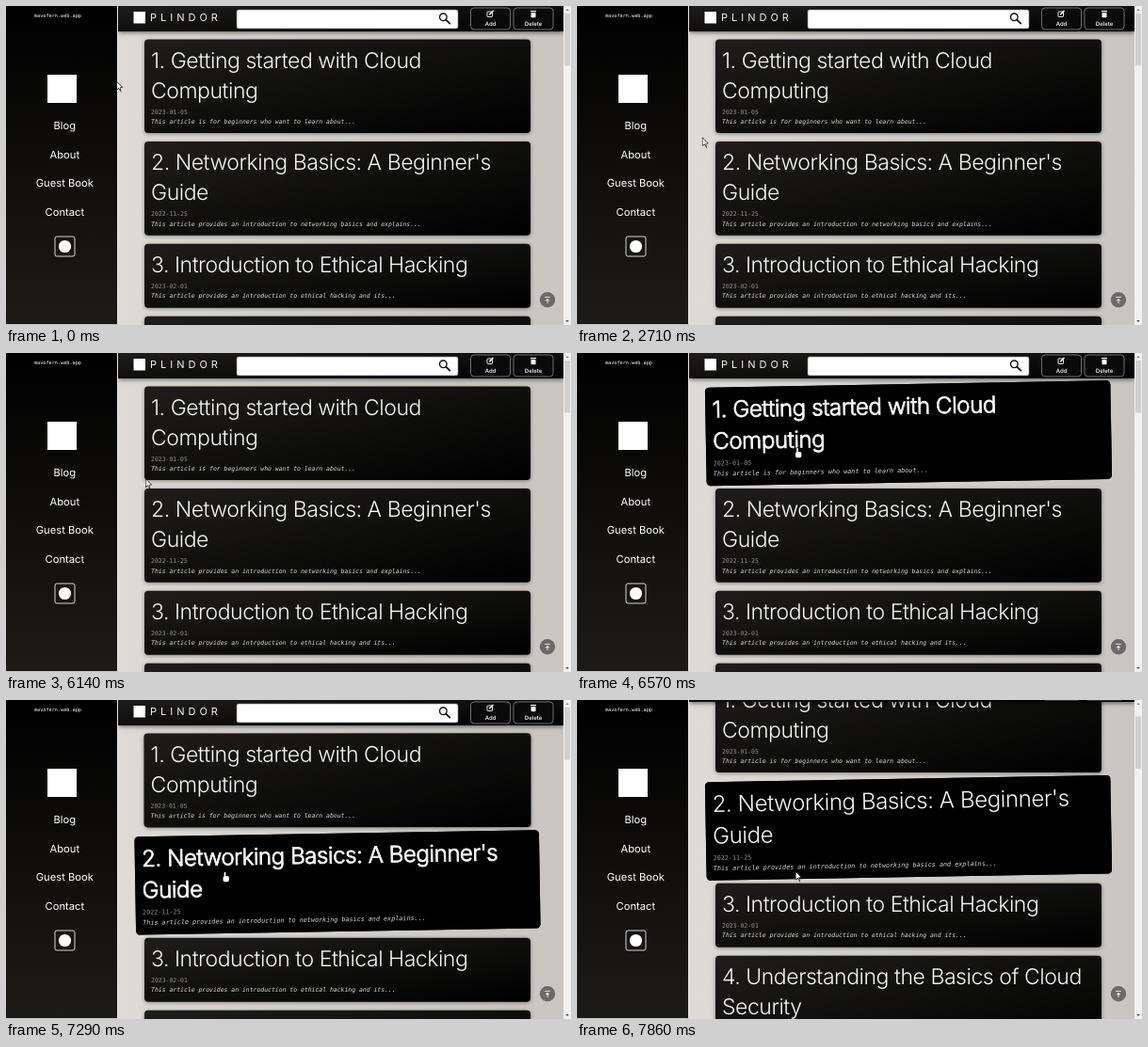
These frames come from a looping animation (600x339 px, 8 s). An HTML page with a canvas:

```html
<!DOCTYPE html>
<html lang="en">
<head>
<meta charset="utf-8">
<title>Article list</title>
<style>
html, body { margin: 0; width: 100%; height: 100%; overflow: hidden; background: #000; }
canvas { display: block; width: 600px; height: 339px; }
</style>
</head>
<body>
<canvas id="stage" width="600" height="339"></canvas>
<script>
const ctx = document.getElementById('stage').getContext('2d');
const W = 600, H = 339, LOOP = 8000, FPS = 7;
const SIDE = 119, BAR = 592, HEADER = 27;
const SANS = 'Inter, "Open Sans", sans-serif';
const MONO = '"DejaVu Sans Mono", "Liberation Mono", monospace';
const CARD_X = 147, CARD_W = 410, GAP = 9, LINE = 32;

const articles = [
  { title: ['1. Getting started with Cloud', 'Computing'], date: '2023-01-05',
    note: 'This article is for beginners who want to learn about...' },
  { title: ['2. Networking Basics: A Beginner\'s', 'Guide'], date: '2022-11-25',
    note: 'This article provides an introduction to networking basics and explains...' },
  { title: ['3. Introduction to Ethical Hacking'], date: '2023-02-01',
    note: 'This article provides an introduction to ethical hacking and its...' },
  { title: ['4. Understanding the Basics of Cloud', 'Security'], date: '', note: '' }
];

// Stack the cards; each extra title line makes a card taller.
let nextY = 35.5;
const cards = articles.map(a => {
  const card = { ...a, y: nextY, h: 68 + (a.title.length - 1) * 31.6 };
  nextY += card.h + GAP;
  return card;
});

const moves = [
  { from: 0, to: 290, x: 97, y: 170 },
  { from: 1290, to: 2400, x: 133.5, y: 140.5 },
  { from: 6000, to: 6570, x: 234, y: 101 },
  { from: 6700, to: 7100, x: 232.5, y: 183 }
];

const clamp = v => Math.max(0, Math.min(1, v));
const ramp = (t, start, length) => clamp((t - start) / length);
const easeOut = p => 1 - (1 - p) ** 2.5;
const smooth = p => p * p * (3 - 2 * p);

function snap(t) {
  const mark = n => Math.round(n * 100 / FPS) * 10;
  let n = Math.floor(t * FPS / 1000) + 1;
  while (mark(n) > t) n--;
  return mark(n);
}

function pointerAt(t) {
  let x = 118, y = 81;
  for (const m of moves) {
    const p = smooth(ramp(t, m.from, m.to - m.from));
    x += (m.x - x) * p;
    y += (m.y - y) * p;
  }
  return { x, y };
}

// Gradient whose middle line joins the bottom left and top right corners.
function cornerGradient(x, y, w, h, light, dark) {
  const k = w * h / (w * w + h * h);
  const cx = x + w / 2, cy = y + h / 2;
  const g = ctx.createLinearGradient(cx - h * k, cy - w * k, cx + h * k, cy + w * k);
  g.addColorStop(0, light);
  g.addColorStop(1, dark);
  return g;
}

function text(str, x, y, font, color, spacing = 0, align = 'left') {
  ctx.font = font;
  ctx.letterSpacing = spacing + 'px';
  ctx.textAlign = align;
  ctx.fillStyle = color;
  ctx.fillText(str, x, y);
}

function rect(x, y, w, h, color) {
  ctx.fillStyle = color;
  ctx.fillRect(x, y, w, h);
}

function box(x, y, w, h, r, fill, stroke, line = 1) {
  ctx.beginPath();
  ctx.roundRect(x, y, w, h, r);
  if (fill) { ctx.fillStyle = fill; ctx.fill(); }
  if (stroke) { ctx.strokeStyle = stroke; ctx.lineWidth = line; ctx.stroke(); }
}

function line(x0, y0, x1, y1, color, width) {
  ctx.beginPath();
  ctx.moveTo(x0, y0);
  ctx.lineTo(x1, y1);
  ctx.strokeStyle = color;
  ctx.lineWidth = width;
  ctx.stroke();
}

function circle(x, y, r, fill, stroke, width) {
  ctx.beginPath();
  ctx.arc(x, y, r, 0, Math.PI * 2);
  if (fill) { ctx.fillStyle = fill; ctx.fill(); }
  if (stroke) { ctx.strokeStyle = stroke; ctx.lineWidth = width; ctx.stroke(); }
}

// dir is -1 for a tip pointing up, 1 for down
function triangle(x, y, size, dir, color) {
  ctx.beginPath();
  ctx.moveTo(x - size, y - dir * size / 2);
  ctx.lineTo(x + size, y - dir * size / 2);
  ctx.lineTo(x, y + dir * size / 2);
  ctx.fillStyle = color;
  ctx.fill();
}

function shadow(alpha, blur) {
  ctx.shadowColor = `rgba(0,0,0,${alpha})`;
  ctx.shadowBlur = blur;
  ctx.shadowOffsetY = alpha ? 1 : 0;
}

function drawPage() {
  const g = ctx.createLinearGradient(SIDE, 0, BAR, 0);
  g.addColorStop(0, '#dedbd7');
  g.addColorStop(1, '#c9c5c0');
  rect(SIDE, 0, BAR - SIDE, H, g);
}

function drawCard({ y, h, title, date, note }, hover, bold) {
  const cx = CARD_X + CARD_W / 2, cy = y + h / 2, grow = 1 + 0.05 * hover;
  ctx.save();
  ctx.translate(cx, cy);
  ctx.rotate(-hover * Math.PI / 180);
  ctx.scale(grow, grow);
  ctx.translate(-cx, -cy);

  shadow(0.4 * (1 - hover), 4);
  box(CARD_X, y, CARD_W, h, 4, cornerGradient(CARD_X, y, CARD_W, h, '#1e1d1b', '#000'));
  shadow(0, 0);
  box(CARD_X, y, CARD_W, h, 4, `rgba(0,0,0,${hover})`);

  title.forEach((str, i) => {
    const base = y + 30.3 + i * LINE;
    text(str, 154, base, `350 23px ${SANS}`, '#f6f6f6', -0.45);
    if (bold) {
      ctx.strokeStyle = '#fff';
      ctx.lineWidth = 0.75;
      ctx.strokeText(str, 154, base);
    }
  });
  const foot = y + 47 + (title.length - 1) * LINE;
  text(date, 154, foot, `6.45px ${MONO}`, '#929190');
  text(note, 154, foot + 10.4, `italic 6.45px ${MONO}`, '#dcdbda');
  ctx.restore();
}

function drawButton(x, label) {
  box(x, 2, 42, 23, 3.5, '#0b0a0a', '#8a8987', 0.8);
  text(label, x + 21, 20.6, `500 6px ${SANS}`, '#fff', 0, 'center');
}

function drawHeader(dy) {
  ctx.save();
  ctx.translate(0, dy);
  shadow(0.6, 5);
  rect(SIDE, 0, BAR - SIDE, HEADER, cornerGradient(SIDE, 0, BAR - SIDE, HEADER, '#1e1d1b', '#000'));
  shadow(0, 0);

  rect(135.5, 6, 12.5, 12.5, '#fff');
  text('PLINDOR', 153, 16.3, `11px ${SANS}`, '#f4f4f4', 4);

  box(245, 4, 235, 20, 2, '#fff', '#777', 0.6);
  circle(464.3, 11.8, 3.8, null, '#111', 1.4);
  line(467, 14.5, 471.8, 19.2, '#111', 1.8);

  drawButton(493.5, 'Add');
  box(511, 6, 5.5, 5.5, 0.6, null, '#fff', 0.9);
  line(513.2, 9.3, 517.5, 5, '#fff', 1.5);

  drawButton(539, 'Delete');
  rect(557, 5, 6, 1.2, '#fff');
  box(557.5, 7, 5, 5.2, 0.7, '#fff');
  ctx.restore();
}

function drawSidebar() {
  const g = ctx.createLinearGradient(0, 0, 0, H);
  g.addColorStop(0, '#000');
  g.addColorStop(1, '#1d1b18');
  rect(0, 0, SIDE, H, g);
  rect(SIDE - 1, 0, 1, H, '#e6e4e1');
  rect(0, H - 1, SIDE, 1, '#c9c8c6');

  text('mavofern.web.app', 30, 11.5, `5.2px ${MONO}`, '#fff');
  rect(44, 73, 31, 30, '#fff');
  ['Blog', 'About', 'Guest Book', 'Contact'].forEach((label, i) =>
    text(label, 62.3, 131 + i * 30.6, `11.2px ${SANS}`, '#fff', 0, 'center'));
  box(52, 245, 21, 21, 2, null, '#d6d6d6');
  circle(62.5, 255.5, 6.6, '#fff');
}

function drawScrollbar(scroll) {
  rect(BAR, 0, W - BAR, H, '#f1f1f1');
  rect(BAR + 1, 8 + scroll * 0.165, 6, 55.5, '#d0d0d0');
  triangle(596, 4, 1.8, -1, '#888');
  triangle(596, H - 4, 1.8, 1, '#444');
}

function drawTopButton() {
  circle(575, 312.3, 8.2, '#6c6a68');
  line(572.2, 309.4, 577.8, 309.4, '#eee', 0.9);
  line(575, 312, 575, 316, '#eee', 0.9);
  triangle(575, 312, 2.4, -1, '#eee');
}

function drawPointer({ x, y }, hand) {
  const shape = new Path2D();
  if (hand) {
    shape.roundRect(-0.9, -0.2, 1.8, 7, 0.9);
    shape.roundRect(-2, 4, 6.4, 6.2, 2);
  } else {
    shape.moveTo(0, 0);
    shape.lineTo(0, 7.4);
    shape.lineTo(1.8, 5.8);
    shape.lineTo(3.4, 8.4);
    shape.lineTo(2.9, 5.4);
    shape.lineTo(5.2, 5.3);
    shape.closePath();
  }
  ctx.save();
  ctx.translate(x, y);
  ctx.strokeStyle = '#000';
  ctx.lineWidth = 1.1;
  ctx.stroke(shape);
  ctx.fillStyle = '#fff';
  ctx.fill(shape);
  ctx.restore();
}

function draw(t) {
  const scroll = 58 * smooth(ramp(t, 7400, 460));
  const swap = easeOut(ramp(t, 6880, 580));
  const hover = [easeOut(ramp(t, 6170, 420)) - swap, swap, 0, 0];
  const pointer = pointerAt(t);

  const overTitle = ({ y, title }) => {
    const top = pointer.y + scroll - y;
    return pointer.x > 165 && top > 4 && top < 36 + (title.length - 1) * LINE;
  };

  drawPage();
  ctx.save();
  ctx.translate(0, -scroll);
  cards.forEach((card, i) => drawCard(card, hover[i], overTitle(card)));
  ctx.restore();
  drawHeader(-25 * smooth(ramp(t, 7450, 410)));
  drawSidebar();
  drawTopButton();
  drawScrollbar(scroll);
  drawPointer(pointer, cards.some(overTitle));
}

ctx.textRendering = 'geometricPrecision';
function tick() {
  draw(snap(performance.now() % LOOP));
  requestAnimationFrame(tick);
}
tick();
</script>
</body>
</html>
```
